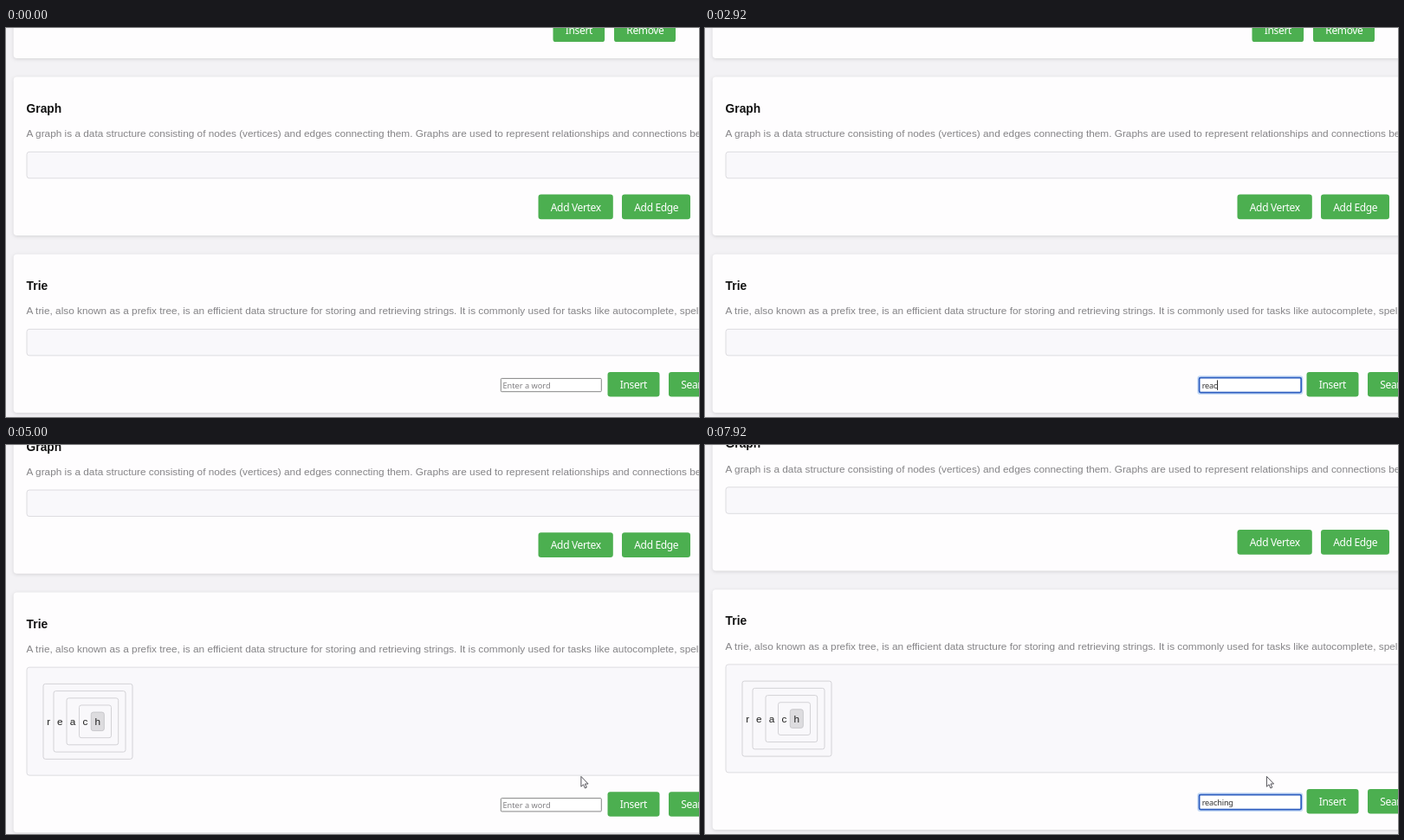
Recreate the animation shown at these times as an HTML page. Size 800 px wide and 450 px high, loop 8000 ms.

```html
<!DOCTYPE html>
<html lang="en">
<head>
<meta charset="utf-8">
<title>Data structures</title>
<style>
  html, body { margin: 0; width: 100%; height: 100%; overflow: hidden; background: #f3f2f5; }
  svg { display: block; width: 100vw; height: 100vh; }
  text { font: 11.82px "Liberation Sans", Arial, sans-serif; white-space: pre; }
  .title { font-size: 13.8px; font-weight: bold; fill: #111; }
  .note { fill: #858487; }
  .card { fill: #fefdfe; filter: drop-shadow(0 1.5px 2px rgba(0, 0, 0, .13)); }
  .box { fill: #f9f8fb; stroke: #dddce0; }
  .button { fill: #4caf50; }
  .label { font: 12px "Noto Sans", "Open Sans", sans-serif; letter-spacing: -.35px; fill: #fff; }
  .node { fill: none; stroke: #d3d2d6; }
  .leaf { fill: #dddcdf; stroke: #c9c8cc; }
  .letter { fill: #222; }
  .field { fill: #fff; stroke: #858585; }
  .halo { fill: #c3d8f5; }
  .ring { fill: #fff; stroke: #2f5fc0; stroke-width: 1.8; }
  .hint { font: 9.2px "Noto Sans", "Open Sans", sans-serif; fill: #807f82; }
  .typed { font: 9.2px "Noto Sans", "Open Sans", sans-serif; letter-spacing: -.2px; fill: #333; }
  .caret { stroke: #222; }
  .arrow { fill: #fcfbfd; stroke: #55545a; stroke-width: 1; stroke-linejoin: round; }
  .beam { fill: none; stroke: #333; }
</style>
</head>
<body>
<svg id="stage" viewBox="0 0 800 450"></svg>
<script>
const LOOP = 8000, FPS = 12, GROW = 94.5;
const INSERTED = 4000, SCROLL_FROM = 4480, SCROLL_TIME = 770;

// Each session: focus and blur times, the word, and the time of every key.
const sessions = [
  { from: 1060, to: INSERTED, word: 'reach', keys: [2070, 2320, 2570, 2820, 3070] },
  { from: 5400, to: LOOP, word: 'reaching', keys: [6070, 6240, 6410, 6570, 6740, 6910, 7070, 7240] }
];

// Pointer waypoints: time, x, y. It hides while typing.
const trips = [
  [[70, 797, 300], [400, 730, 372], [850, 644, 409], [1330, 644, 409], [1580, 661.7, 376.8], [1820, 650, 384]],
  [[3570, 650, 384], [3920, 725, 408.5], [4300, 725, 408.5], [5000, 663.5, 383], [5300, 643, 408],
   [5460, 643, 408], [5660, 642, 382], [6070, 642, 382]],
  [[7900, 648, 383], [LOOP, 648, 383]]
];

const stage = document.getElementById('stage');

function add(parent, tag, attrs = {}, content = '') {
  const el = document.createElementNS('http://www.w3.org/2000/svg', tag);
  for (const key in attrs) el.setAttribute(key, attrs[key]);
  el.textContent = content;
  return parent.appendChild(el);
}
const rect = (parent, cls, x, y, width, height, rx = 3) =>
  add(parent, 'rect', { class: cls, x, y, width, height, rx });
const text = (parent, cls, x, y, content) => add(parent, 'text', { class: cls, x, y }, content);

function button(parent, x, y, width, label) {
  rect(parent, 'button', x, y, width, 28.6, 3.2);
  text(parent, 'label', x + 14.3, y + 19, label);
}

function card(y, title, note) {
  const g = add(page, 'g', { transform: `translate(0 ${y})` });
  const back = rect(g, 'card', 8.7, 0, 830, 183.3, 4);
  text(g, 'title', 23.6, 41.3, title);
  text(g, 'note', 23.6, 69.6, note);
  const box = rect(g, 'box', 24, 86.7, 800, 30.5);
  return { g, back, box };
}

const page = add(stage, 'g');
rect(page, 'card', 8.7, -60, 830, 95, 4);
button(page, 631.5, -12.5, 59.6, 'Insert');
button(page, 702, -12.5, 71, 'Remove');

const graph = card(56.6, 'Graph', 'A graph is a data structure consisting of nodes (vertices) and edges ' +
  'connecting them. Graphs are used to represent relationships and connections between objects.');
button(graph.g, 614.5, 136, 86.3, 'Add Vertex');
button(graph.g, 711, 136, 79, 'Add Edge');

const trie = card(261.7, 'Trie', 'A trie, also known as a prefix tree, is an efficient data structure for ' +
  'storing and retrieving strings. It is commonly used for tasks like autocomplete, spell checking.');

const tree = add(trie.g, 'g');
[[43, 103, 87], [55, 83, 70.5], [70, 59.7, 54], [84.5, 37, 37.7], [98.3, 15, 21.5]].forEach(([x, w, h], i) => {
  rect(tree, i < 4 ? 'node' : 'leaf', x, 149.4 - h / 2, w, h, 2.5);
});
[47.3, 59, 73.8, 88.5, 102.6].forEach((x, i) => text(tree, 'letter', x, 153.6, 'reach'[i]));

const foot = add(trie.g, 'g');
button(foot, 694.5, 136.2, 60, 'Insert');
button(foot, 765, 136.2, 64, 'Search');
const field = rect(foot, 'field', 571.3, 143.7, 116, 15.3, 1);
const focus = add(foot, 'g');
rect(focus, 'halo', 568.3, 140.6, 122, 21.8, 3);
rect(focus, 'ring', 570.6, 142.9, 117.6, 17, 1.5);
const hint = text(foot, 'hint', 573.5, 154.9, 'Enter a word');
const typed = text(foot, 'typed', 573.7, 154.9, '');
const caret = add(foot, 'path', { class: 'caret', d: 'M0 145.7V157.2' });

const pointer = add(stage, 'g');
const arrow = add(pointer, 'path', { class: 'arrow', d: 'M.4.4V12.2L3.1 9.8 4.9 14 6.8 13.1 5 9H8.6Z' });
const beam = add(pointer, 'path', { class: 'beam', d: 'M-2.5-6.5H2.5M0-6.5V6.5M-2.5 6.5H2.5' });

const show = (el, on) => el.setAttribute('visibility', on ? 'inherit' : 'hidden');
const move = (el, x, y) => el.setAttribute('transform', `translate(${x} ${y})`);
const clamp = v => Math.min(1, Math.max(0, v));
const smooth = v => v * v * (3 - 2 * v);

function drawPointer(t) {
  const trip = trips.find(p => t >= p[0][0] && t < p[p.length - 1][0]);
  show(pointer, trip);
  if (!trip) return;
  const i = trip.findIndex(p => t < p[0]);
  const [t0, x0, y0] = trip[i - 1], [t1, x1, y1] = trip[i];
  const k = smooth((t - t0) / (t1 - t0));
  const x = x0 + (x1 - x0) * k, y = y0 + (y1 - y0) * k;
  const overField = x > 571 && x < 688 && y > 404 && y < 422;
  arrow.setAttribute('display', overField ? 'none' : 'inline');
  beam.setAttribute('display', overField ? 'inline' : 'none');
  move(pointer, x, y);
}

function drawField(t) {
  const s = sessions.find(s => t >= s.from && t < s.to);
  const count = s ? s.keys.filter(k => t >= k).length : 0;
  show(field, !s);
  show(focus, s);
  show(hint, !count);
  typed.textContent = s ? s.word.slice(0, count) : '';
  const since = s ? t - (count ? s.keys[count - 1] : s.from) : 0;
  show(caret, s && since % 1000 < 500);
  move(caret, 574 + (count ? typed.getComputedTextLength() : 0), 0);
}

function draw(t) {
  const extra = t >= INSERTED ? GROW : 0;
  const scroll = GROW * (1 - (1 - clamp((t - SCROLL_FROM) / SCROLL_TIME)) ** 3);
  move(page, 0, -scroll);
  trie.back.setAttribute('height', 183.3 + extra);
  trie.box.setAttribute('height', 30.5 + extra);
  move(foot, 0, extra);
  show(tree, extra);
  drawField(t);
  drawPointer(t);
}

const start = performance.now();
function tick() {
  const t = (performance.now() - start) % LOOP;
  draw(Math.floor((t + 4) * FPS / 1000) * 1000 / FPS % LOOP);
  requestAnimationFrame(tick);
}
tick();
</script>
</body>
</html>
```
